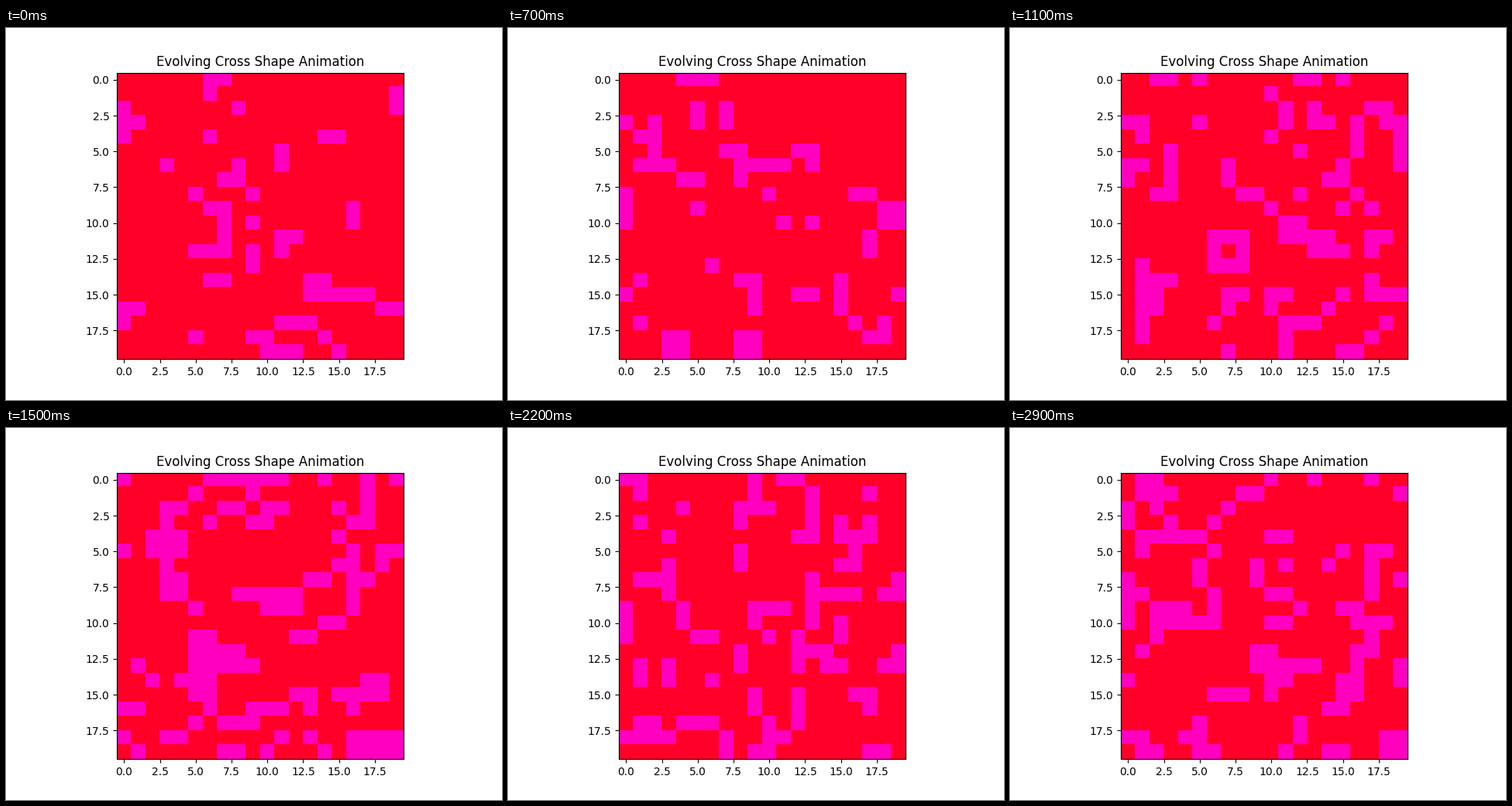
A matplotlib script for the animation above (3 s loop, 640 px wide and 480 px high).

```python
import numpy as np
import matplotlib.pyplot as plt
from matplotlib.animation import FuncAnimation

SIZE = 20
FRAMES = 30
INTERVAL = 100
CROSSES = 9
CROSS = [(0, 0), (-1, 0), (1, 0), (0, -1), (0, 1)]


def add_crosses(board, rng):
    for row, col in rng.integers(0, SIZE, (CROSSES, 2)):
        for dr, dc in CROSS:
            board[(row + dr) % SIZE, (col + dc) % SIZE] = 1


def life_step(board):
    near = sum(
        np.roll(board, (dr, dc), axis=(0, 1))
        for dr in (-1, 0, 1) for dc in (-1, 0, 1) if dr or dc
    )
    return ((near == 3) | ((board == 1) & (near == 2))).astype(int)


def evolve():
    """Life on a torus, stirred by random crosses before every step."""
    rng = np.random.default_rng(7)
    board = rng.integers(0, 2, (SIZE, SIZE))
    boards = []
    for _ in range(FRAMES):
        add_crosses(board, rng)
        board = life_step(board)
        boards.append(board.copy())
    return boards


boards = evolve()

fig, ax = plt.subplots(figsize=(6.4, 4.8), dpi=100)
image = ax.imshow(boards[0], cmap="gist_rainbow", vmin=0, vmax=1,
                  interpolation="nearest")
ax.set_title("Evolving Cross Shape Animation")


def update(frame):
    image.set_data(boards[frame])
    return [image]


anim = FuncAnimation(fig, update, frames=FRAMES, interval=INTERVAL,
                     repeat=True, repeat_delay=0)
plt.show()
```
